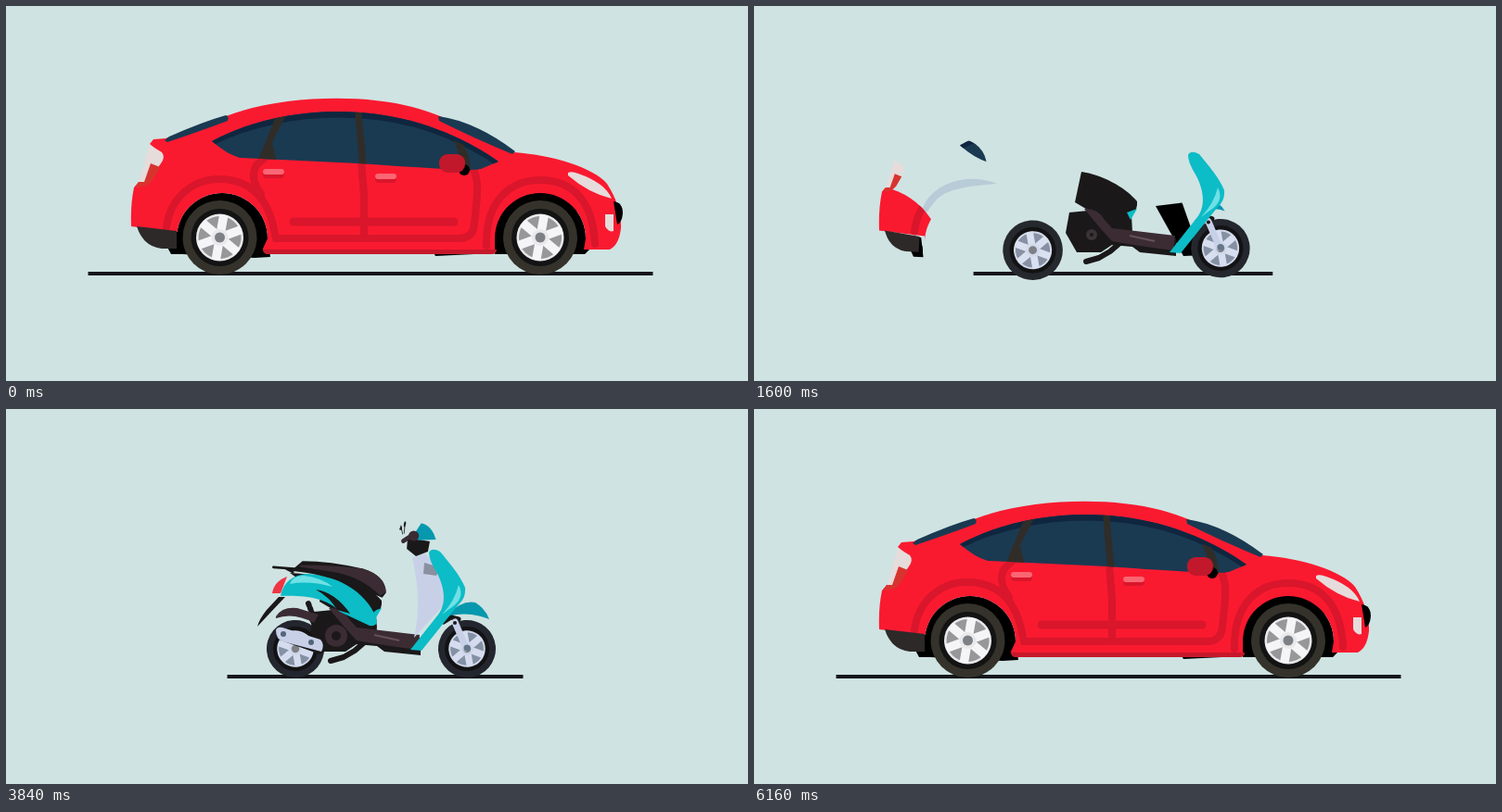
Recreate the animation shown at these times as an HTML page. Size 800 px wide and 405 px high, loop 6200 ms.

```html
<!DOCTYPE html>
<html lang="en">
<head>
<meta charset="utf-8">
<title>Car and scooter</title>
<style>
html, body { margin: 0; width: 100%; height: 100%; overflow: hidden; background: #cfe3e2; }
svg { display: block; width: 100vw; height: 100vh; }
.red { fill: #fa1a30; }
.crease { fill: none; stroke: #d9162b; stroke-width: 8; stroke-linecap: round; }
.navy { fill: #1a3a52; }
.pale { fill: #e5dcdb; }
.post { fill: #302d29; }
.ink { fill: #1a1819; }
.brown { fill: #3b2c33; }
.teal { fill: #0cbcc6; }
.deep { fill: #0698ae; }
.mint { fill: #6fe0e6; }
.lilac { fill: #c8d0e8; }
.line { fill: none; stroke: #1a1819; stroke-linecap: round; stroke-linejoin: round; }
.base, .late, [data-leave] { transform-box: fill-box; transform-origin: center; }
.hinge { transform-origin: left top !important; }
.foot { transform-origin: left bottom !important; }
.tyre { fill: color-mix(in srgb, #34322a, #23262e var(--mix)); }
.rim { fill: color-mix(in srgb, #97979a, #8490a4 var(--mix)); }
.shine { fill: color-mix(in srgb, #e9e9eb, #ced6ea var(--mix)); }
#spokes { stroke: color-mix(in srgb, #f5f5f7, #d5dcef var(--mix)); stroke-width: 9.5; }
</style>
</head>
<body>
<svg viewBox="0 0 800 405">
  <defs>
    <clipPath id="bodyClip"><circle id="bodyWipe" cx="125" cy="268"/></clipPath>
    <clipPath id="glassClip"><circle id="glassWipe" cx="222" cy="168"/></clipPath>
    <clipPath id="archClip"><circle id="archWipe" cx="150" cy="260"/></clipPath>
    <clipPath id="glassShape"><path d="M222,146C262,124 312,114 358,114C420,114 480,132 531,168L512,176Q503,179 380,170L252,164Q238,160 222,146Z"/></clipPath>
    <g id="wheel">
      <circle class="tyre" r="40"/>
      <circle r="31" fill="#131314"/>
      <circle class="shine" r="25.5"/>
      <circle class="rim" r="23"/>
      <g id="spokes"></g>
      <circle class="shine" r="9"/>
      <circle r="5.5" fill="#7d8084"/>
    </g>
  </defs>

  <rect width="800" height="405" fill="#cfe3e2"/>
  <path id="ground" fill="none" stroke="#15161b" stroke-width="4"/>

  <path data-leave="1700 2040 0 0" fill="#b8cbd8" d="M180,226C184,196 225,177 262,192C238,194 208,196 196,210L182,228Z"/>
  <path id="chassis"/>

  <g id="car">
    <path clip-path="url(#archClip)" d="M176,262L184,251A49,49 0 0 1 282,251L285,271L268,272L190,268Z"/>
    <g clip-path="url(#bodyClip)">
      <path d="M527,266V251A49,49 0 0 1 625,251L630,262L624,268H527Z"/>
      <path class="red" d="M155,149L159,144L172,143L240,118C298,96 386,95 438,109Q480,120 548,158C590,161 634,175 648,192Q664,217 663,240Q661,258 651,263H623L625,251A49,49 0 0 0 527,251V264Q528,268 523,268H283Q277,268 277,262L282,251A49,49 0 0 0 184,251V244L135,238Q134,215 138,196L143,190L168,160Z"/>
      <g class="crease">
        <path d="M173,239C177,207 201,187 230,187C262,187 283,205 290,246L291,251H490Q504,250 505,235C509,195 512,190 497,160"/>
        <path d="M283,160L270,172Q262,186 275,203"/>
        <path d="M383,168L386,205V246"/>
        <path d="M518,259C517,212 542,188 576,188C612,188 633,212 635,257"/>
        <path d="M310,233H483" stroke-width="9"/>
      </g>
      <path d="M277,263H529Q529,268 523,268H283Q278,268 277,263Z" fill="#c6182b"/>
    </g>
    <g clip-path="url(#glassClip)">
      <g clip-path="url(#glassShape)">
        <rect class="navy" x="220" y="110" width="315" height="72"/>
        <path d="M222,147C262,127 312,117 358,117C420,117 480,134 531,170" fill="none" stroke="#10263f" stroke-width="7"/>
        <g class="post" data-leave="720 2000 40 0">
          <path d="M290,122L302,118L287,147L292,170H270Z"/>
          <path d="M376,112H383L389,174H381Z"/>
        </g>
      </g>
    </g>
    <path data-leave="740 1260 20 0" class="post" d="M483,145L493,150Q501,162 501,178L492,171Z"/>
    <g data-leave="500 1340 9 0"><rect x="277" y="176" width="23" height="10" rx="4" fill="#d9162b"/><rect x="277" y="176" width="23" height="6" rx="3" fill="#fa6673"/></g>
    <g data-leave="500 1060 9 0"><rect x="398" y="181" width="23" height="10" rx="4" fill="#d9162b"/><rect x="398" y="181" width="23" height="6" rx="3" fill="#fa6673"/></g>
    <g data-leave="720 1440 17 0"><circle cx="494" cy="177" r="6"/><rect x="467" y="160" width="28" height="20" rx="9" fill="#c1182c"/></g>
    <path data-leave="720 1280 0 -24" class="navy foot" d="M171,145L176,141Q212,125 237,118Q241,119 239,124Q210,135 174,147Z"/>
    <path data-leave="560 1320 0 -6" class="navy hinge" d="M466,119Q505,124 549,157L546,160Q505,143 467,124Z"/>
    <path data-leave="740 1080 0 0" class="pale hinge" d="M606,180Q610,178 617,181Q646,191 653,208Q628,202 606,183Z"/>
    <path data-leave="720 1320 32 0" d="M655,211Q665,212 665,224Q664,234 659,236Z"/>
    <path data-leave="600 1280 12 0" class="pale" d="M646,225H655V243Q650,245 646,238Z"/>
    <g class="foot" data-leave="1400 1680 0 0">
      <path class="pale" d="M155,150L168,158Q172,163 167,170L153,190H143Z"/>
      <path d="M156,170L166,174L158,188Q152,196 140,196L143,190H149Z" fill="#d8342f"/>
    </g>
    <g class="hinge" data-leave="1400 1740 0 4">
      <path d="M165,244H186L190,268H178Z"/>
      <path d="M141,238L184,243V262H168Q148,260 141,238Z" fill="#2d2929"/>
    </g>
  </g>

  <path class="deep late" d="M476,222Q492,206 506,209Q517,216 521,227Q499,218 476,224Z"/>
  <g id="rear"><use href="#wheel"/></g>
  <g id="front"><use href="#wheel"/></g>

  <g id="mid">
    <path class="ink base" d="M345,175C366,178 392,191 405,207Q406,216 399,222L400,241L375,240L360,221L338,208Z"/>
    <g class="base">
      <path class="line" stroke-width="6" d="M391,248L376,261L364,268L350,272"/>
      <path class="ink" d="M332,219L352,217L378,230L384,250L366,262L340,262L328,241Z"/>
      <circle cx="356" cy="243" r="6" fill="#3b3337"/>
      <circle class="ink" cx="356" cy="243" r="2"/>
    </g>
    <g class="base">
      <path class="ink" d="M372,240L447,247L447,266L408,262L400,256L377,254Z"/>
      <path class="brown" d="M348,215Q363,214 370,227L378,236L446,244L444,260Q405,255 378,250Q364,235 348,215Z"/>
      <path d="M397,244L424,250" stroke="#655159" stroke-width="2"/>
    </g>
    <path class="teal base" d="M394,219L405,215L398,227Z"/>
  </g>

  <g id="fork">
    <g class="base">
      <path class="line" stroke-width="5" d="M472,230L480,225L488,227"/>
      <path d="M484,230L496,258" fill="none" stroke="#c8d0e8" stroke-width="7" stroke-linecap="round"/>
      <circle cx="497" cy="258" r="3.5" fill="#65768a"/>
      <circle cx="484" cy="231" r="2" fill="#1a1819"/>
    </g>
  </g>

  <g id="shield">
    <g class="late foot">
      <path class="lilac" d="M438,161L452,156L474,180L479,204L440,247Q449,206 438,161Z"/>
      <path d="M451,166L468,171L464,180L450,178Z" fill="#8b90a0"/>
    </g>
    <g class="base foot">
      <path class="teal" d="M456,155Q459,149 468,154C477,165 490,180 495,193Q496,204 488,211L448,261L436,260L466,222C476,209 472,190 464,176Q456,163 456,155Z"/>
      <path class="mint" d="M488,190Q496,205 478,216L470,222Q484,207 488,190Z"/>
    </g>
  </g>

  <g class="late">
    <path class="line" stroke-width="6" stroke-dasharray="2 3" stroke-linecap="butt" d="M326,210L332,226"/>
    <path class="ink" d="M324,222L350,218L352,250L334,242Z"/>
    <circle class="brown" cx="356" cy="245" r="12"/>
    <circle class="ink" cx="356" cy="245" r="5"/>
  </g>
  <path class="brown late" d="M291,224Q298,213 314,215L337,222L332,231Q310,219 291,226Z"/>
  <path class="ink late" d="M294,203L301,203L284,221L271,235Q273,227 281,217Z"/>
  <g class="late">
    <path class="ink" d="M291,248L339,265L348,259L340,251Z"/>
    <path class="lilac" d="M291,239Q292,235 298,236L339,249Q344,254 340,262L298,251Q291,248 291,239Z"/>
    <g fill="#53657a"><circle cx="299" cy="243" r="3"/><circle cx="329" cy="252" r="3"/></g>
  </g>
  <g class="late">
    <path class="ink" d="M306,177Q350,178 402,207L403,213L396,220L400,236L370,222Z"/>
    <path class="teal" d="M296,202Q300,180 325,178C360,179 393,202 400,229Q400,235 392,234L360,219C345,203 320,201 296,202Z"/>
    <path class="ink" d="M334,195Q355,198 371,221L357,217Q349,203 334,195Z"/>
    <path class="mint" d="M306,189Q309,180 321,180Q340,182 352,192Q326,185 306,189Z"/>
  </g>
  <path class="late" fill="#f03444" d="M287,199Q289,186 303,181L296,199Z"/>
  <g class="late">
    <path class="ink" d="M309,175L321,165Q350,165 384,173Q407,180 408,198L404,203C380,193 351,179 309,175Z"/>
    <path class="brown" d="M318,169Q353,169 384,173Q407,180 408,197L402,201Q382,181 352,176L318,171Z"/>
  </g>
  <path class="line late" stroke-width="2.4" d="M289,171L316,173M301,172L309,176"/>
  <path class="ink late" d="M433,139L457,143L455,154L442,159L432,151Z"/>
  <g class="late">
    <path class="deep" d="M448,121Q462,123 468,143L443,144L439,135Z"/>
    <path d="M424,145L436,137" stroke="#3b2c33" stroke-width="6" stroke-linecap="round"/>
    <circle class="brown" cx="438" cy="138" r="7"/>
  </g>
  <g class="late foot">
    <path class="line" stroke-width="2" d="M437,133L439,112M433,135L430,121"/>
    <path class="ink" d="M436,116Q435,106 439,100Q443,102 442,108L439,116Z"/>
    <path class="ink" d="M429,110Q433,119 431,125L424,123Z"/>
  </g>
</svg>

<script>
const LOOP = 6200, FRAME = 40, TURN = 6160, POP = 360;
const $ = id => document.getElementById(id);
const all = selector => [...document.querySelectorAll(selector)];

$('spokes').innerHTML = Array.from({ length: 6 }, (_, i) =>
  `<path d="M0,0V-24.5" transform="rotate(${10 + i * 60})"/>`).join('');

const ramp = (t, from, to) => Math.min(1, Math.max(0, (t - from) / (to - from)));
const smooth = (t, from, to) => { const p = ramp(t, from, to); return p * p * (3 - 2 * p); };
const backOut = p => 1 + 2.2 * (p - 1) ** 3 + 1.2 * (p - 1) ** 2;
const lerp = (a, b, p) => a + (b - a) * p;

// The scooter frame grows from the shield backwards, the rest follows in paint order
const pops = [
  ...all('.base').reverse().map((el, i) => ({ el, start: 1050 + 30 * i })),
  ...all('.late').map((el, i) => ({ el, start: 1560 + 60 * i }))
];
// Car parts drift or swing out, then shrink: start, end, drift, angle
const leaves = all('[data-leave]').map(el => ({ el, spec: el.dataset.leave.split(' ').map(Number) }));

function pose(el, x, angle, scale) {
  el.style.transform = `translate(${x}px) rotate(${angle}deg) scale(${scale})`;
  el.style.visibility = scale > .001 ? 'visible' : 'hidden';
}

function wipe(id, speed, end, t) {
  $(id).setAttribute('r', Math.max(0, speed * (end - t)));
}

function shift(id, x, y) {
  $(id).setAttribute('transform', `translate(${x} ${y})`);
}

// Rolls a wheel from its place on the car to the one on the scooter, dipping on the way
function roll(id, from, to, p, t) {
  const x = lerp(from, to, p);
  const y = lerp(250, 259, p) + 14 * Math.sin(Math.PI * p);
  const scale = lerp(1, 31 / 40, p);
  $(id).setAttribute('transform', `translate(${x} ${y}) rotate(${t / 4}) scale(${scale})`);
  $(id).style.setProperty('--mix', `${p * 100}%`);
  return [x - to, y - 259];
}

function draw(t) {
  for (const { el, start } of pops) pose(el, 0, 0, backOut(ramp(t, start, start + POP)));
  for (const { el, spec: [start, end, drift, angle] } of leaves) {
    const p = ramp(t, start, end), out = 1 - (1 - p) ** 2;
    pose(el, drift * out, angle * out, 1 - p ** 4);
  }

  wipe('bodyWipe', .54, 1745, t);
  wipe('glassWipe', .48, 1660, t);
  wipe('archWipe', .2, 1760, t);
  shift('car', 0, 6 * smooth(t, 760, 1120) - 1.5 * smooth(t, 0, 720));

  const fold = ramp(t, 980, 1650) ** 2;
  $('chassis').setAttribute('d',
    `M433,216L${lerp(632, 433, fold)},${lerp(192, 216, fold)}L${lerp(592, 463, fold)},${lerp(264, 270, fold)}L463,270Z`);

  const narrow = smooth(t, 1040, 1640);
  $('ground').setAttribute('d', `M${lerp(88.5, 238.5, narrow)},289H${lerp(697.5, 557.5, narrow)}`);

  roll('rear', 230.5, 312, ramp(t, 1080, 1620) ** 4, t);
  shift('fork', ...roll('front', 576, 497, ramp(t, 860, 1660), t));

  const loose = 1 - smooth(t, 1620, 2000);
  shift('mid', 8 * loose, 4 * loose);
  shift('shield', 12 * loose, 6 * loose);
}

const begin = performance.now();
function tick() {
  const elapsed = Math.max(0, performance.now() - begin) % LOOP;
  const t = Math.floor(elapsed / FRAME) * FRAME;
  draw(Math.min(t, TURN - t));
  requestAnimationFrame(tick);
}
tick();
</script>
</body>
</html>
```
